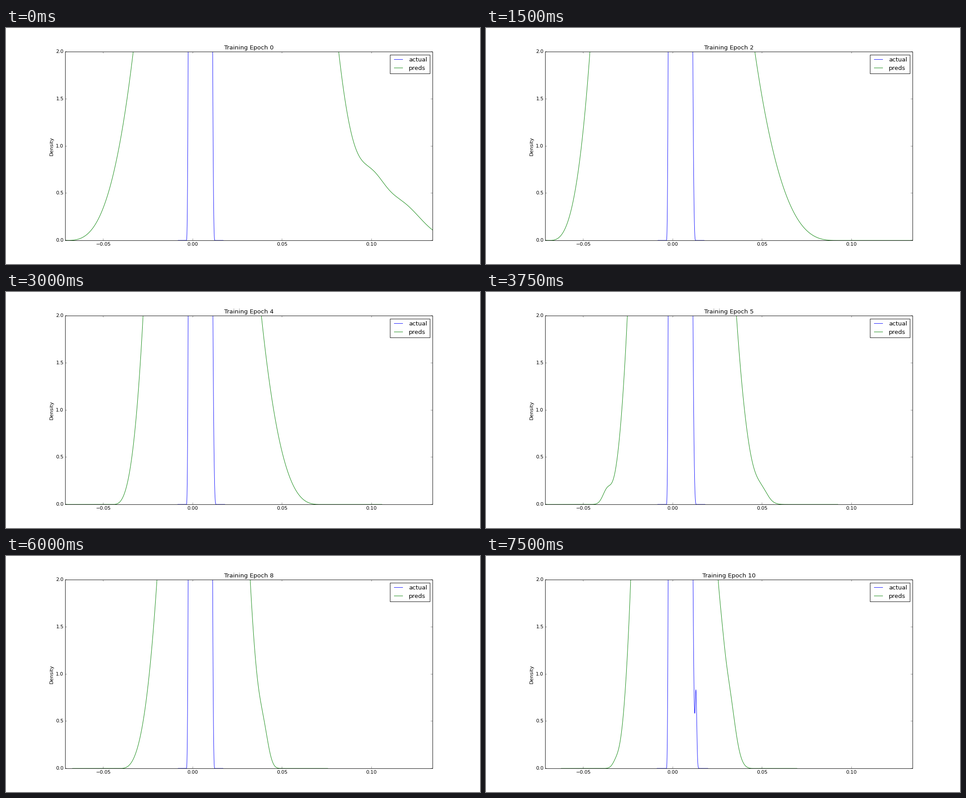
Animation, 1058 px wide and 529 px high, one loop 8000 ms. Source, as a matplotlib script:

```python
import numpy as np
import matplotlib.pyplot as plt
from matplotlib.animation import FuncAnimation

plt.style.use("classic")
plt.rcParams.update({
    "font.family": "DejaVu Sans",
    "figure.facecolor": "white",
    "savefig.facecolor": "white",
    "savefig.dpi": "figure",
})

W, H, DPI = 1058, 529, 66.125
ZERO_X, PX_PER_UNIT = 416.9, 3990.0   # stage x of 0.00 and its scale
TICK_MS, TICKS, HOLD = 250, 32, 3     # each epoch holds three ticks

# Predictions per epoch, in stage x: left top, left foot, right top, right foot.
# A flank is at density 2 at its top and reaches 0 at its foot.
PREDS = [
    (284, 133, 742, 880),
    (211.5, 141.5, 583, 788),
    (232, 140, 600, 785),
    (246, 168, 585.5, 715.5),
    (306, 238, 570, 703),
    (315.5, 255.5, 559, 646),
    (279.5, 223.5, 512, 582),
    (287, 212, 500, 587),
    (337, 253.5, 545, 613),
    (329, 252, 535, 636),
    (323, 275, 517, 597),
]
# Shoulders on the flanks: centre, height, width
PRED_HUMPS = {
    0: [(817, .37, 29), (875, .40, 48)],
    1: [(157, .35, 23), (655, .06, 14), (757, .07, 22)],
    3: [(195, .075, 14), (655, .145, 25)],
    5: [(270, .15, 9.5), (617, .12, 14)],
    6: [(545, .54, 12), (570, .19, 13)],
    8: [(576, .19, 10)],
    10: [(289, .06, 7.5), (526, .11, 7), (545, .28, 12)],
}
# The narrow curve changes only on its right side
ACTUAL_LEFT = (406.5, 402.6)
ACTUAL_FOOT = [466.3, 470.9, 468, 467.5, 469, 469.5,
               465.5, 468, 466, 469, 470.4]
ACTUAL_HUMPS = {6: [(466.6, .84, 1.8)], 10: [(468.6, .81, 1.8)]}


def flank(x, top, foot):
    return 2 * np.maximum((x - foot) / (top - foot), 0) ** 3


def density(edges, humps):
    """Curve between two flanks, with a flat margin beyond its ends."""
    left_top, left_foot, right_top, right_foot = edges
    lo = min([left_foot] + [c - 3.2 * w for c, _, w in humps])
    hi = max([right_foot] + [c + 3.2 * w for c, _, w in humps])
    margin = 0.293 * (hi - lo)
    x = np.linspace(lo - margin, hi + margin, 1000)
    y = np.minimum(flank(x, left_top, left_foot),
                   flank(x, right_top, right_foot))
    for centre, height, width in humps:
        y += height * np.exp(-((x - centre) / width) ** 2 / 2)
    return (x - ZERO_X) / PX_PER_UNIT, y


def preds(epoch):
    return density(PREDS[epoch], PRED_HUMPS.get(epoch, []))


def actual(epoch):
    foot = ACTUAL_FOOT[epoch]
    top = 461.3 + 0.2 * (foot - 466.3)
    return density((*ACTUAL_LEFT, top, foot), ACTUAL_HUMPS.get(epoch, []))


fig, ax = plt.subplots(figsize=(W / DPI, H / DPI), dpi=DPI)
actual_line, = ax.plot([], [], color="b", label="actual")
preds_line, = ax.plot([], [], color="g", label="preds")
ax.set_xlim((0.125 * W - ZERO_X) / PX_PER_UNIT, (0.9 * W - ZERO_X) / PX_PER_UNIT)
ax.set_ylim(0, 2)
ax.set_xticks([-0.05, 0, 0.05, 0.10])
ax.set_yticks([0, 0.5, 1, 1.5, 2])
ax.set_ylabel("Density")
ax.legend(loc="upper right", labelspacing=0.45)
title = ax.set_title("Training Epoch 0")


def draw(tick):
    epoch = tick // HOLD
    actual_line.set_data(*actual(epoch))
    preds_line.set_data(*preds(epoch))
    title.set_text(f"Training Epoch {epoch}")
    return actual_line, preds_line, title


anim = FuncAnimation(fig, draw, frames=TICKS, interval=TICK_MS,
                     repeat=True, repeat_delay=0, blit=False)
plt.show()
```
